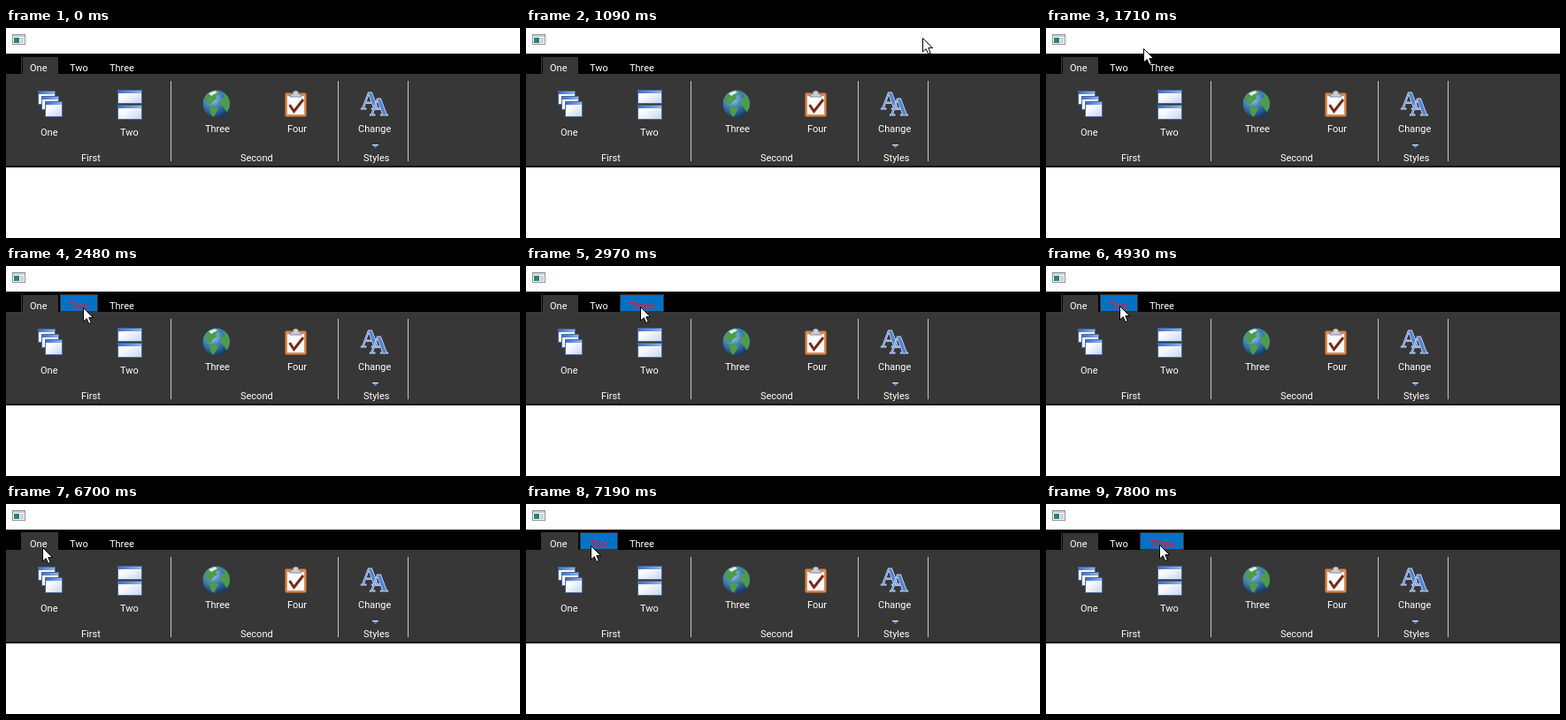
Animation of 581 by 238 pixels, one loop 8000 ms. Source, as an HTML page:

```html
<!DOCTYPE html>
<html lang="en">
<head>
<meta charset="utf-8">
<title>Ribbon tabs</title>
<style>
html, body { margin: 0; width: 100%; height: 100%; overflow: hidden; background: #fff; }
svg { display: block; }
text { font: 11px Roboto, "Open Sans", sans-serif; fill: #fff; }
.tab rect { visibility: hidden; }
.tab.hot rect { visibility: visible; }
.tab.hot text { fill: #f01232; }
.glyph { font: bold 29px "Liberation Serif", serif; fill: #5583cf; stroke: #c9dcfa; stroke-width: .8; }
</style>
</head>
<body>
<svg width="581" height="238" viewBox="0 0 581 238">
  <defs>
    <linearGradient id="pane" x2="1" y2="1">
      <stop offset=".3" stop-color="#fff"/><stop offset="1" stop-color="#c3d5ef"/>
    </linearGradient>
    <linearGradient id="bar">
      <stop stop-color="#3f6fca"/><stop offset="1" stop-color="#8db4f0"/>
    </linearGradient>
    <radialGradient id="sea" cx=".36" cy=".3" r=".75">
      <stop stop-color="#a9d3f2"/><stop offset=".4" stop-color="#4788c4"/><stop offset="1" stop-color="#12355f"/>
    </radialGradient>
    <clipPath id="disc"><circle cx="238" cy="86" r="15"/></clipPath>
  </defs>

  <!-- window icon -->
  <rect x="7.5" y="7.5" width="14" height="11" fill="#f4f6f7" stroke="#8d979c"/>
  <path d="M8 8H21V10H8Z" fill="#c5ced3"/>
  <path d="M9 11H15V17H9Z" fill="#2b8277"/>
  <path d="M16 11H20V17H16Z" fill="#c9d3da"/>

  <!-- ribbon -->
  <path d="M0 29H581V158H0Z"/>
  <path d="M0 52H581V156H0Z" fill="#373737"/>
  <path d="M17 32H59V52H17Z" fill="#373737"/>
  <path id="edge" d="M18.5 52V32.5H59" fill="none" stroke="#0c0c0c"/>
  <path d="M186.5 60V151M375.5 60V151M454.5 60V151" stroke="#c6c6c6"/>

  <text x="27" y="49" fill="#fffff0">One</text>
  <g class="tab">
    <rect x="61.5" y="32.5" width="42" height="19" fill="#0072c6" stroke="#343434"/>
    <text x="72" y="49">Two</text>
  </g>
  <g class="tab">
    <rect x="106.5" y="32.5" width="49" height="19" fill="#0072c6" stroke="#343434"/>
    <text x="117" y="49">Three</text>
  </g>

  <g id="labels"></g>
  <g id="windows"></g>

  <!-- globe -->
  <circle cx="238" cy="86" r="15.5" fill="url(#sea)"/>
  <g clip-path="url(#disc)" fill="#4f9a4c">
    <path d="M224 80Q228 72 237 71L241 74 237 77 239 80 234 83 231 87 227 86Z"/>
    <path d="M230 88L236 88 240 92 237 97 234 102 231 96Z"/>
    <path d="M244 73L254 78 255 92 250 96 246 90 242 87 243 81 247 78Z"/>
    <path d="M229 74L236 71 239 73 232 77Z" fill="#dcefe6"/>
  </g>

  <!-- clipboard -->
  <rect x="315.5" y="73.5" width="24" height="27" rx="2" fill="#d98a4e" stroke="#9c5526"/>
  <path d="M318 77H337V98H318Z" fill="#f8faff"/>
  <path d="M321 78V75H324Q324 71 327.5 71T331 75H334V78Z" fill="#c9ced8" stroke="#6d7480" stroke-width=".8"/>
  <path d="M320.5 87L325.5 94.5 336 81" fill="none" stroke="#782a16" stroke-width="3"/>

  <!-- letter pair -->
  <text class="glyph" x="401" y="92">A</text>
  <text class="glyph" x="411" y="99">A</text>
  <path d="M414 132.5H421L417.5 136Z" fill="#5b8de0"/>
  <path d="M414 132.5H421" stroke="#e3edff"/>

  <path id="cursor" d="M.5 .5V16L4.2 12.6 6.7 18.4 9.3 17.3 6.8 11.6H11.6Z" fill="#fff" stroke="#000" stroke-width="1"/>
</svg>
<script>
const LOOP = 8000;
const $ = id => document.getElementById(id);
const [two, three] = document.querySelectorAll('.tab');

// text, x, baseline
$('labels').innerHTML = [
  ['One', 39, 122], ['Two', 129, 122], ['Three', 225, 118], ['Four', 318, 118], ['Change', 398, 118],
  ['First', 85, 151], ['Second', 265, 151], ['Styles', 404, 151]
].map(([s, x, y]) => `<text x="${x}" y="${y}">${s}</text>`).join('');

// x, y, width, height
$('windows').innerHTML = [
  [36, 71, 20, 16], [40, 77, 20, 16], [44, 83, 20, 18], [126, 70, 28, 16], [126, 87, 28, 17]
].map(([x, y, w, h]) =>
  `<rect x="${x + .5}" y="${y + .5}" width="${w - 1}" height="${h - 1}" fill="url(#pane)" stroke="#4a6796"/>
   <rect x="${x + 1}" y="${y + 1}" width="${w - 2}" height="3" fill="url(#bar)"/>`).join('');

// first step, last step, step count, cursor x and y at the end
const moves = [
  [910, 1710, 11, 110, 23],
  [1790, 2100, 5, 80, 47],
  [2480, 2970, 7, 129, 46],
  [3280, 3660, 6, 177, 42],
  [3880, 4070, 3, 137, 46],
  [4150, 4280, 2, 135, 48],
  [4440, 4930, 7, 83, 45],
  [6080, 6250, 3, 36, 49],
  [6700, 7190, 7, 73, 47],
  [7490, 7800, 5, 128, 46]
];

function cursorAt(t) {
  let x = 575, y = 7;
  for (const [from, to, steps, endX, endY] of moves) {
    if (t < from) break;
    const step = Math.floor((t - from) / (to - from) * (steps - 1) + 1e-6);
    const p = Math.min(1, (step + 1) / steps);
    x += (endX - x) * p;
    y += (endY - y) * p;
  }
  return [Math.round(x), Math.round(y)];
}

function draw(now) {
  const t = now % LOOP;
  const [x, y] = cursorAt(t);
  const over = (left, right) => y >= 32 && x >= left && x < right;
  $('cursor').setAttribute('transform', `translate(${x} ${y})`);
  $('cursor').style.visibility = t < 910 ? 'hidden' : 'visible';
  two.classList.toggle('hot', over(61, 104));
  three.classList.toggle('hot', over(106, 156));
  // the first tab stays flat until the pointer has moved on from its neighbour
  $('edge').style.visibility = t >= 6160 && t < 7490 ? 'hidden' : 'visible';
}

const start = performance.now();
function frame() {
  draw(performance.now() - start);
  requestAnimationFrame(frame);
}
frame();
</script>
</body>
</html>
```
